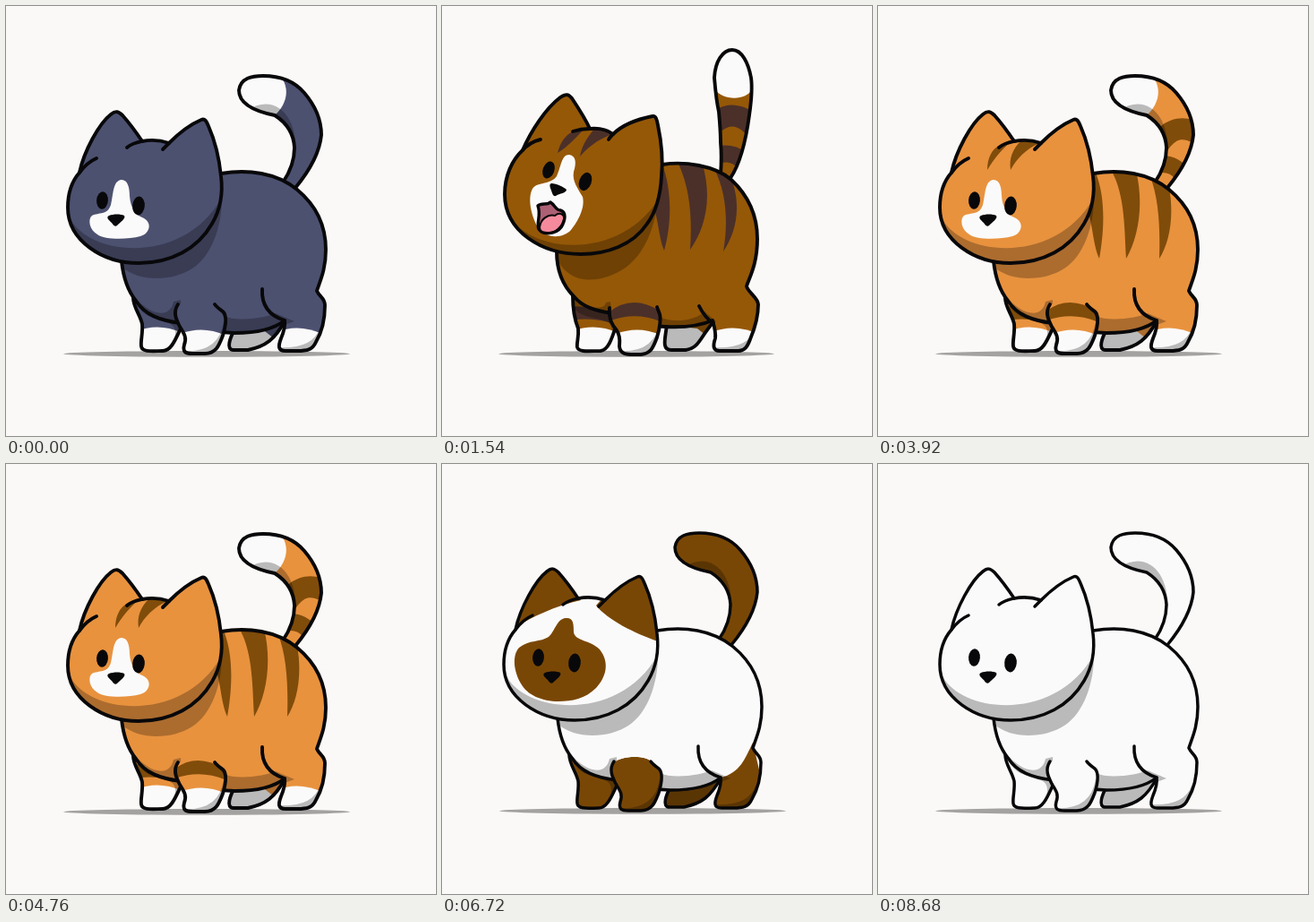
Animation, 480 px wide and 480 px high, one loop 8.82 s. Source, as an HTML page with a canvas:

```html
<!DOCTYPE html>
<html lang="en">
<head>
<meta charset="utf-8">
<title>Meowing cats</title>
<style>
html, body { margin: 0; height: 100%; overflow: hidden; background: #fbf9f7; }
canvas { display: block; }
</style>
</head>
<body>
<canvas id="stage" width="480" height="480"></canvas>
<script>
const ctx = document.getElementById('stage').getContext('2d');
const spine = document.createElementNS('http://www.w3.org/2000/svg', 'path');
const INK = '#08080a', WHITE = '#fbfafa', SHADE = 'rgba(0,0,0,.26)';
const STEP = 140, LIFT = [0, .5, 1, 1, 1, .5, 0];

const CATS = [
  { coat: '#4d5170', socks: true, blaze: true },
  { coat: '#955807', socks: true, blaze: true, stripes: '#4b3029' },
  { coat: WHITE, light: true, patches: ['#774605', '#e89340'], tail: '#e89340', rings: '#774605' },
  { coat: '#a5a5a5', socks: true, blaze: true, stripes: '#5c5c60' },
  { coat: '#e8923e', socks: true, blaze: true, stripes: '#804c0a' },
  { coat: '#a5a5a5', socks: true, mask: WHITE },
  { coat: WHITE, light: true, mask: '#794705', points: '#794705', tail: '#794705' },
  { coat: WHITE, light: true, patches: ['#4d5170', '#4d5170'], tail: '#4d5170' },
  { coat: WHITE, light: true }
];

// Each shape is a pair: standing pose, meowing pose.
const SHAPES = {
  tail: ['M309 197C318 184 322 171 322 158C321 140 311 129 300 122C285 119 260 112 260 94C262 80 275 78 287 78C305 78 322 84 333 97C345 111 352 128 352 144C350 165 337 186 323 203',
    'M311 188C312 175 312 163 311 152C311 140 310 129 309 118C306 105 305 92 304 80C305 62 313 49 324 49C335 49 342 64 345 80C347 94 345 108 343 122C339 152 332 177 322 192'],
  tailTip: ['M309 82C317 96 312 112 298 124L250 122L250 70Z', 'M346 93C340 106 312 106 304 92L300 44L350 44Z'],
  tailShade: ['M270 116C300 97 325 122 323 162L300 150Z', 'M305 95C308 112 311 130 311 150L300 130Z'],
  spine: ['M316 200C330 185 337 165 337 150C337 120 315 98 268 96', 'M317 190C322 160 325 140 326 120C326 95 325 70 324 45'],
  farHind: ['M256 360C250 370 245 384 254 384L270 384C290 380 300 372 311 352', 'M251 356C249 372 245 384 256 384L272 384C287 382 288 370 302 354'],
  farFront: ['M142 326C142 336 150 345 152 355C153 365 150 374 151 380C152 387 165 385 175 385C185 385 190 370 196 358',
    'M146 324C146 340 148 350 152 360C153 370 150 376 151 381C153 387 165 385 177 385C186 384 190 370 195 355'],
  farFrontShade: ['M140 320L150 338C155 348 172 350 182 354C193 359 190 372 180 387L200 387L205 320Z', 'M140 320L148 338C155 348 174 348 184 352C194 358 190 372 180 387L200 387L205 320Z'],
  body: ['M129 285C131 303 136 318 145 329C155 345 172 351 195 354C215 361 235 365 255 365C280 365 300 360 311 351C312 358 310 364 307 371C304 379 303 385 312 385L325 385C336 385 342 384 346 375C352 365 356 350 356 334C356 326 350 325 347 318C350 308 357 295 357 272C357 247 348 224 325 205C302 186 270 182 240 187',
    'M128 274C128 295 135 312 147 324C157 336 170 340 190 343C208 353 228 357 250 358C270 359 288 357 302 351C304 358 306 364 305 371C302 380 303 385 310 385L331 385C338 385 341 380 344 372C350 358 353 345 353 333C353 326 342 320 340 313C342 305 352 290 352 260C352 230 338 208 323 194C305 178 270 173 246 177'],
  thigh: ['M286 316C285 335 295 346 311 351', 'M287 335C291 343 296 350 303 354'],
  castShade: ['M126 288C145 309 185 308 208 293C230 279 241 245 241 215L180 200Z', 'M124 270C135 314 175 312 205 292C225 277 238 250 242 210L180 200Z'],
  bellyShade: ['M243 346C258 353 290 348 301 343L322 352L311 356L300 372L240 372Z', 'M243 347C256 354 282 352 293 341L306 352L300 356L295 366L240 366Z'],
  chestShade: ['M143 324C160 345 183 350 187 330L195 328L196 358L150 352Z', 'M144 320C160 338 181 341 183 331L188 330L190 348L150 345Z'],
  bodyStripes: ['M240 180C256 210 252 255 247 282C241 270 240 250 236 235ZM260 183C276 210 275 250 277 282C291 258 297 220 288 184ZM303 188C314 215 315 250 314 282C325 265 331 235 325 203Z',
    'M244 172C258 205 256 245 248 273C243 262 242 245 238 230ZM263 174C278 205 279 240 277 272C293 250 303 215 290 174ZM303 180C319 210 319 245 314 274C327 255 336 225 322 190Z'],
  hindPoint: ['M347 312C338 330 333 346 311 351L295 390L365 390Z', 'M341 310C332 335 318 348 300 352L290 390L360 390Z'],
  nearFront: ['M192 333C186 342 190 350 194 358C199 366 202 370 199 378C197 386 200 388 208 388L222 388C235 388 238 378 242 368C246 355 246 345 242 341C238 338 235 336 233 333',
    'M187 337C186 350 190 356 195 362C200 370 198 376 198 380C199 389 206 389 215 389L222 389C234 388 236 380 240 370C244 358 244 347 243 344C242 341 241 339 240 336'],
  head: ['M82 186C87 162 104 131 117 121C122 117 125 117 130 122C138 131 146 142 152 151C162 149 173 150 182 153C193 142 206 132 218 127C222 125 224 129 226 134C234 152 238 170 240 190C242 206 240 226 230 243C214 271 184 287 148 287C108 287 69 262 69 225C69 208 74 195 82 186Z',
    'M90 161C99 140 116 114 132 102C138 98 141 98 145 103C153 115 161 128 165 137C175 136 184 138 191 143C203 131 220 126 235 123C239 122 240 128 241 133C245 152 247 170 245 190C244 210 240 228 229 243C213 267 184 277 155 277C112 277 70 252 70 210C70 190 78 172 90 161Z'],
  headLines: ['M82 186C88 178 94 173 101 170M135 158C141 153 147 152 152 151M175 160C178 157 180 155 182 153', 'M90 161C95 155 102 151 110 149M146 140C152 138 160 137 165 137M186 149C187 147 189 145 191 143'],
  headShade: ['M72 238C95 280 200 290 242 212L250 300L60 300Z', 'M73 232C100 279 205 285 246 208L250 300L60 300Z'],
  headStripes: ['M122 183C122 170 127 160 135 156L149 151C138 160 130 170 122 183ZM148 183C146 170 150 160 160 150L180 153C165 160 155 170 148 183Z',
    'M129 164C132 152 138 144 146 140L160 136C150 146 142 156 129 164ZM154 168C156 156 162 147 170 137L190 143C172 150 163 158 154 168Z'],
  blaze: ['M129 194C136 194 138 203 138 212C139 226 145 233 152 236C164 241 161 254 150 257C135 261 110 261 102 255C93 250 91 238 96 234C104 230 113 234 117 222C120 210 119 195 129 194Z',
    'M142 166C150 167 150 176 147 185C145 196 152 204 157 213C160 225 152 240 144 250C135 260 115 260 107 247C100 235 95 215 101 204C106 196 121 200 128 190C133 180 133 166 142 166Z'],
  mask: ['M138 173C147 172 147 180 147 189C149 199 165 197 176 208C187 222 184 238 172 251C160 263 145 266 130 266C112 266 95 259 88 246C80 232 78 215 86 206C97 197 110 200 119 194C126 188 128 174 138 173Z',
    'M152 149C162 149 165 158 165 166C167 176 180 180 187 192C194 207 192 222 183 229C170 236 160 250 148 258C135 266 108 262 98 248C93 235 95 225 92 215C87 203 85 185 95 175C108 165 125 168 135 163C142 158 143 150 152 149Z'],
  earPoints: ['M70 190L84 182C100 172 125 160 155 153L120 100ZM172 159C185 175 215 190 241 199L250 120L215 110Z', 'M78 168L92 159C108 150 140 142 168 138L140 85ZM183 148C195 162 220 175 246 182L255 120L230 105Z'],
  leftPatch: ['M76 190C110 184 142 174 153 154L120 100Z', 'M84 168C112 174 152 166 167 141L140 85Z'],
  rightPatch: ['M176 159C156 168 160 190 177 203C193 216 218 222 232 216C240 210 242 190 239 170L222 115Z', 'M187 148C165 156 168 180 184 192C200 206 222 214 236 211C244 205 248 180 245 150L240 110Z'],
  nose: ['M115 234C120 232 128 232 132 234C134 237 128 241 124 245C122 247 120 245 118 242C115 239 111 236 115 234Z', 'M122 198C128 198 136 202 139 205C139 209 131 209 127 212C124 213 123 209 122 206C121 203 119 199 122 198Z']
};
const MOUTH = 'M107 223C111 219 117 223 121 219C126 222 127 228 132 228C139 230 138 239 133 247C127 255 112 256 108 249C105 242 111 234 107 223Z';
const TONGUE = 'M109 247C110 238 118 232 126 234C131 230 137 232 136 238C134 247 126 254 117 254C112 254 109 251 109 247Z';
// Distance along the tail and width of each ring.
const TABBY_RINGS = [[22, 19], [65, 24]];
const PATCH_RINGS = [[6, 14], [44, 22], [87, 20], [150, 60]];

let lift = 0;
const mix = (a, b) => a + (b - a) * lift;

function shape(name) {
  const [rest, meow] = SHAPES[name], target = meow.match(/\d+/g);
  let i = 0;
  return rest.replace(/\d+/g, n => mix(+n, +target[i++]));
}

function fill(path, color) {
  ctx.fillStyle = color;
  ctx.fill(new Path2D(path));
}

function stroke(path, color = INK) {
  ctx.strokeStyle = color;
  ctx.stroke(new Path2D(path));
}

function ellipse(x, y, rx, ry, angle, color) {
  ctx.fillStyle = color;
  ctx.beginPath();
  ctx.ellipse(x, y, rx, ry, angle, 0, 7);
  ctx.fill();
}

// Fills a part, decorates it inside its own edge, then outlines it.
function part(name, color, decorate, closing = '') {
  const outline = shape(name);
  ctx.save();
  ctx.clip(new Path2D(outline + closing));
  fill(outline + closing, color);
  decorate();
  ctx.restore();
  stroke(outline);
}

const sock = (x, y) => fill(`M${x - 26} ${y}q26 -10 52 2v32h-52z`, WHITE);

function drawRings(color, rings) {
  spine.setAttribute('d', shape('spine'));
  for (const [at, width] of rings) {
    const p = spine.getPointAtLength(at - 1), q = spine.getPointAtLength(at + 1);
    ctx.save();
    ctx.translate(q.x, q.y);
    ctx.rotate(Math.atan2(q.y - p.y, q.x - p.x) + Math.PI / 2);
    ctx.lineWidth = width;
    ctx.lineCap = 'butt';
    stroke('M-26 12Q0 -16 26 12', color);
    ctx.restore();
  }
}

function drawBack(cat) {
  const legs = cat.points || cat.coat;
  part('tail', cat.tail || cat.coat, () => {
    if (cat.rings) drawRings(cat.rings, PATCH_RINGS);
    if (cat.stripes) drawRings(cat.stripes, TABBY_RINGS);
    if (cat.socks) fill(shape('tailTip'), WHITE);
    fill(shape('tailShade'), SHADE);
  });
  part('farHind', legs, () => {
    if (cat.socks) fill('M240 355L285 360L299 371L290 392L240 392Z', WHITE);
    fill('M230 330H320V395H230Z', SHADE);
  }, 'L300 340L250 345Z');
  part('farFront', legs, () => {
    if (cat.stripes) fill('M138 336Q170 332 200 350V358Q170 345 138 352Z', cat.stripes);
    if (cat.socks) sock(171, 363);
    fill(shape('farFrontShade'), SHADE);
  }, 'L196 322Z');
}

function drawBody(cat) {
  part('body', cat.coat, () => {
    if (cat.stripes) fill(shape('bodyStripes'), cat.stripes);
    if (cat.patches) {
      ellipse(mix(262, 261), mix(239, 229), 21.5, 26, .55, cat.patches[0]);
      ellipse(mix(330, 326), mix(252, 243), 25, 28, -.2, cat.patches[1]);
    }
    if (cat.points) fill(shape('hindPoint'), cat.points);
    if (cat.socks) sock(327, 364);
    for (const s of ['castShade', 'bellyShade', 'chestShade']) fill(shape(s), SHADE);
    fill('M300 381Q342 384 350 360V390H300Z', SHADE);
  });
  stroke(shape('thigh'));
  part('nearFront', cat.points || cat.coat, () => {
    if (cat.stripes) fill('M186 342Q213 320 246 342V353Q216 340 186 352Z', cat.stripes);
    if (cat.socks) sock(220, 366);
    fill('M196 385Q238 388 243 352L250 392H196Z', SHADE);
  }, 'C228 326 198 326 190 336Z');
}

function drawHead(cat, gape) {
  part('head', cat.coat, () => {
    if (cat.stripes) fill(shape('headStripes'), cat.stripes);
    if (cat.points) fill(shape('earPoints'), cat.points);
    if (cat.patches) {
      fill(shape('leftPatch'), cat.patches[0]);
      fill(shape('rightPatch'), cat.patches[1]);
    }
    if (cat.blaze) fill(shape('blaze'), WHITE);
    if (cat.mask) fill(shape('mask'), cat.mask);
    fill(shape('headShade'), SHADE);
  });
  stroke(shape('headLines'));
  ellipse(mix(107.5, 119), mix(217, 183), 6.4, 9.8, mix(.08, .35), INK);
  ellipse(mix(148, 160), mix(223, 196), 6.8, 10.5, mix(.08, .35), INK);
  fill(shape('nose'), INK);
  if (!gape) return;
  ctx.save();
  ctx.translate(122, mix(252, 222));
  ctx.scale(gape, gape);
  ctx.translate(-122, -222);
  fill(MOUTH, '#ad6074');
  fill(TONGUE, '#f58a9c');
  ctx.lineWidth = 2;
  stroke(TONGUE);
  ctx.lineWidth = 3.4;
  stroke(MOUTH);
  ctx.restore();
}

function draw(now) {
  const tick = Math.floor(now / STEP) % (CATS.length * LIFT.length);
  const cat = CATS[Math.floor(tick / LIFT.length)], phase = tick % LIFT.length;
  lift = LIFT[phase];
  ctx.fillStyle = '#fbf9f7';
  ctx.fillRect(0, 0, 480, 480);
  ctx.save();
  ctx.translate(0, cat.light ? -1 : 0);
  ctx.lineWidth = cat.light ? 3.5 : 3.9;
  ctx.lineCap = ctx.lineJoin = 'round';
  ellipse(mix(224, 217), 388.3, mix(160, 154), 3.4, 0, '#a3a2a0');
  drawBack(cat);
  drawBody(cat);
  drawHead(cat, phase === 3 ? 1.06 : lift);
  ctx.restore();
}

const start = performance.now();
function frame() {
  draw(performance.now() - start);
  requestAnimationFrame(frame);
}
frame();
</script>
</body>
</html>
```
